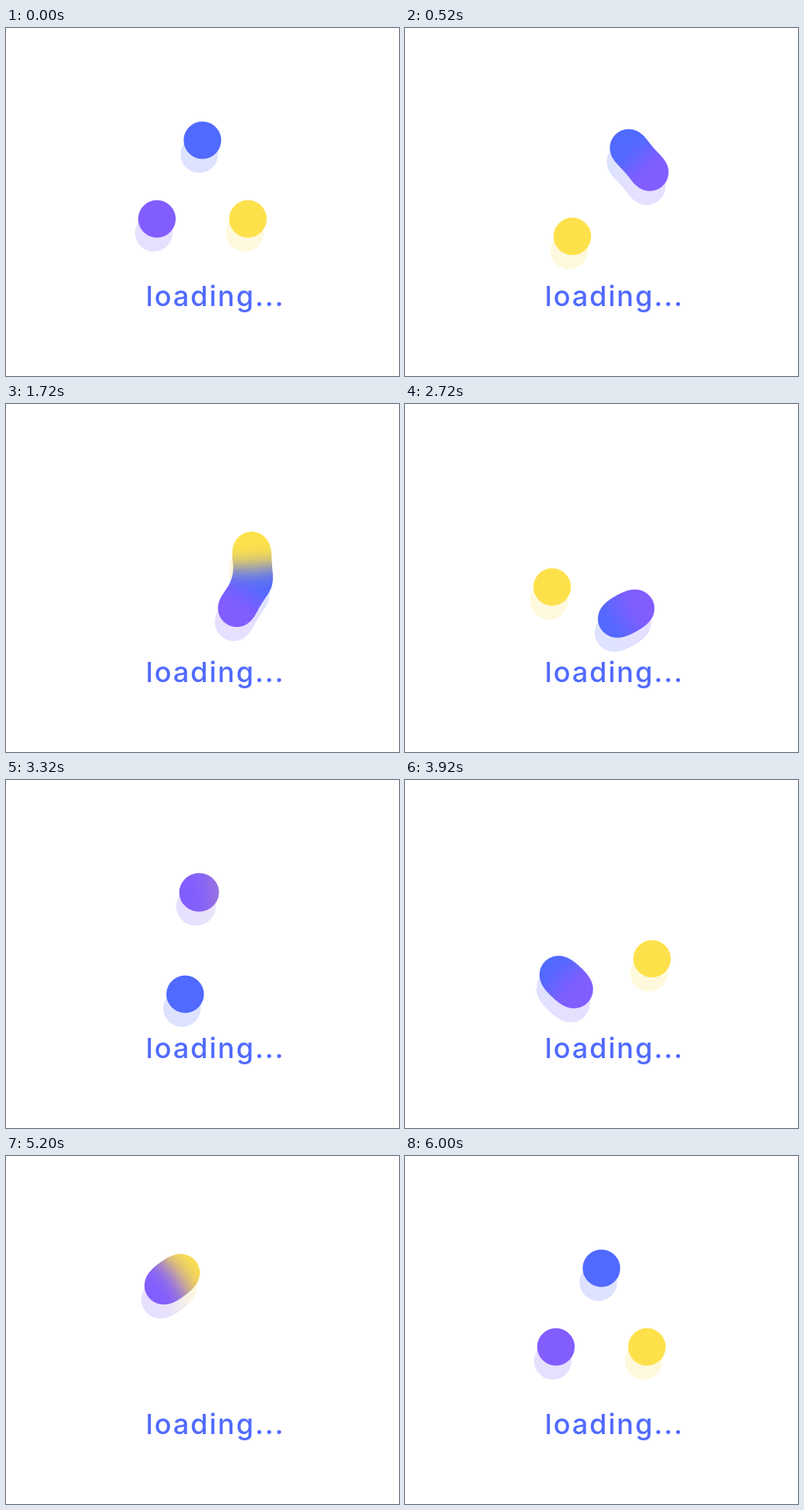
Recreate the animation shown at these times as an HTML page. Size 505 by 448 pixels, loop 6040 ms.

```html
<!DOCTYPE html>
<html lang="en">
<head>
<meta charset="utf-8">
<title>Loading</title>
<style>
  html, body { margin: 0; width: 100%; height: 100%; overflow: hidden; background: #fff; }
  svg { display: block; }
  text { font: 500 36px Inter, "Liberation Sans", sans-serif; letter-spacing: 1.9px; fill: #506aff; }
</style>
</head>
<body>
<svg width="505" height="448" viewBox="0 0 505 448">
  <defs>
    <!-- Blur, then cut alpha so that a lone ball keeps its radius -->
    <filter id="goo" filterUnits="userSpaceOnUse" x="90" y="50" width="325" height="325"
            color-interpolation-filters="sRGB">
      <feGaussianBlur stdDeviation="13.6"/>
      <feColorMatrix values="1 0 0 0 0  0 1 0 0 0  0 0 1 0 0  0 0 0 40 -14.74"/>
    </filter>
    <g id="balls" filter="url(#goo)"></g>
  </defs>
  <use href="#balls" transform="translate(-4 18)" opacity=".19"/>
  <use href="#balls"/>
  <text x="179.7" y="358">loading...</text>
</svg>
<script>
  const LOOP = 6040, STEP = 40;
  const CX = 252.4, CY = 212, ORBIT = 67.5, RADIUS = 24;

  // Angles are clockwise degrees from the top, speeds are degrees per second
  const balls = [
    { color: '#506aff', angle: 0, speed: 60 },
    { color: '#fde14b', angle: 120, speed: 180 },
    { color: '#825dff', angle: 240, speed: 360 }
  ];

  const group = document.getElementById('balls');
  for (const ball of balls) {
    ball.node = document.createElementNS('http://www.w3.org/2000/svg', 'circle');
    ball.node.setAttribute('r', RADIUS);
    ball.node.setAttribute('fill', ball.color);
    group.appendChild(ball.node);
  }

  function draw(ms) {
    const sec = Math.floor((ms % LOOP + 0.5) / STEP) * STEP / 1000;
    for (const { node, angle, speed } of balls) {
      const a = (angle + speed * sec) * Math.PI / 180;
      node.setAttribute('cx', CX + ORBIT * Math.sin(a));
      node.setAttribute('cy', CY - ORBIT * Math.cos(a));
    }
  }

  const start = performance.now();
  function tick() {
    draw(performance.now() - start);
    requestAnimationFrame(tick);
  }
  tick();
</script>
</body>
</html>
```
